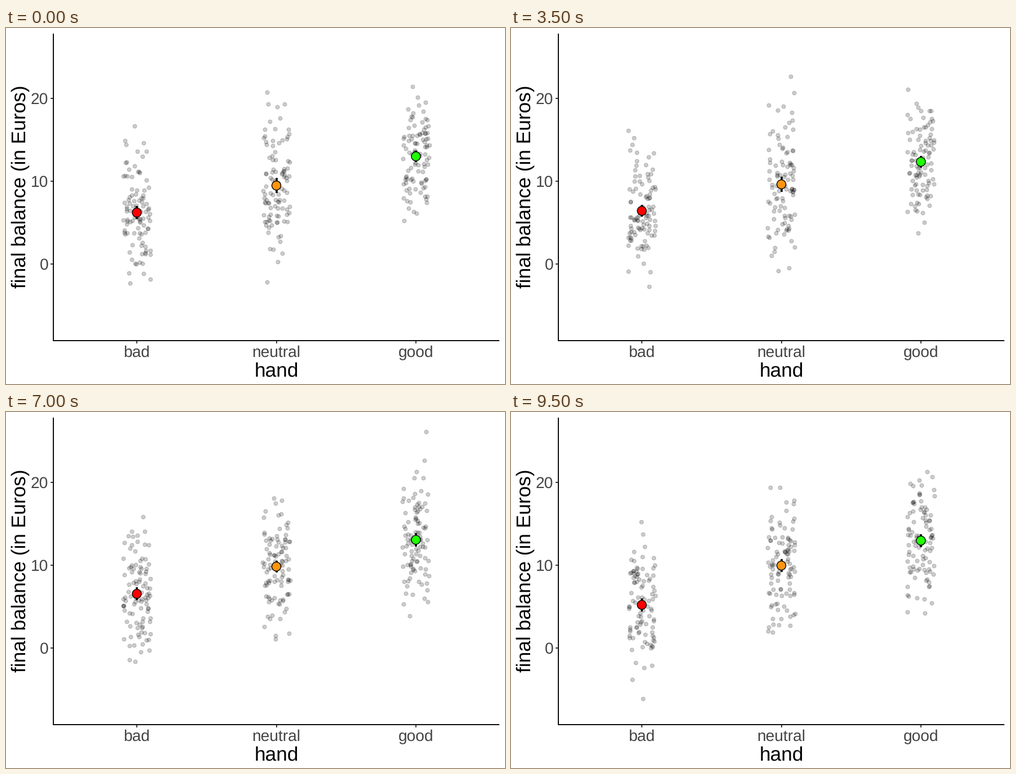
These frames come from a looping animation (885x632 px, 10000 ms). A matplotlib script:

```python
import numpy as np
import matplotlib.pyplot as plt
from matplotlib.animation import FuncAnimation

W, H, DPI = 885, 632, 100
PT = 72 / DPI  # points per pixel
FRAMES, INTERVAL = 20, 500
N = 100
JITTER = 24.5
INK, AXIS_TEXT = "#333333", "#444444"

HANDS = ["bad", "neutral", "good"]
COLORS = ["#ff0000", "#ff9510", "#1fff00"]
MEANS = np.array([6.0, 9.9, 12.7])
SDS = np.array([4.2, 4.2, 3.8])
CENTERS = 232 + 247.5 * np.arange(3)


def to_y(balance):
    return 419 - 14.68 * balance


def sample(i):
    """One fresh experiment: jittered x, balances, means and 95% half-intervals."""
    rng = np.random.default_rng(100 + i)
    balance = rng.normal(MEANS, SDS, (N, 3))
    x = CENTERS + rng.uniform(-JITTER, JITTER, (N, 3))
    half = 1.96 * balance.std(axis=0, ddof=1) / np.sqrt(N)
    return x, balance, balance.mean(axis=0), half


plt.rcParams.update({"font.family": "Liberation Sans", "text.hinting": "none"})
fig = plt.figure(figsize=(W / DPI, H / DPI), dpi=DPI, facecolor="white")
ax = fig.add_axes([0, 0, 1, 1])
ax.set(xlim=(0, W), ylim=(H, 0))
ax.axis("off")


def line(xs, ys, color="black", width=1.9):
    ax.plot(xs, ys, color=color, lw=width * PT, solid_capstyle="butt")


def label(x, y, text, size, color="black", ha="center", rotation=0):
    ax.text(x, y, text, fontsize=size * PT, color=color, ha=ha, va="baseline",
            rotation=rotation, rotation_mode="anchor")


for value in (0, 10, 20):
    y = to_y(value)
    line([79, 84], [y, y], INK)
    label(75.3, y + 9.8, str(value), 28.1, AXIS_TEXT, "right")
for x, hand in zip(CENTERS, HANDS):
    line([x, x], [554.5, 559.5], INK)
    label(x, 584, hand, 28.1, AXIS_TEXT)
line([84, 84], [10, 555.4])
line([83.1, 875], [554.5, 554.5])
label(479.5, 618.3, "hand", 35.3)
label(34.5, 281.8, "final balance (in Euros)", 35.3, rotation=90)

dots = ax.scatter([], [], s=(6.9 * PT) ** 2, c="black", edgecolors="black",
                  alpha=0.2, linewidths=1.1 * PT, zorder=3)
bars = ax.vlines(CENTERS, 0, 1, colors="black", lw=3.6 * PT, zorder=4)
markers = ax.scatter(CENTERS, CENTERS, s=(16 * PT) ** 2, c=COLORS,
                     edgecolors="black", linewidths=1.4 * PT, zorder=5)


def update(i):
    x, balance, mean, half = sample(i)
    dots.set_offsets(np.column_stack([x.ravel(), to_y(balance).ravel()]))
    bars.set_segments([[(c, to_y(m - h)), (c, to_y(m + h))]
                       for c, m, h in zip(CENTERS, mean, half)])
    markers.set_offsets(np.column_stack([CENTERS, to_y(mean)]))
    return dots, bars, markers


anim = FuncAnimation(fig, update, frames=FRAMES, interval=INTERVAL, repeat=True, repeat_delay=0)
plt.show()
```
